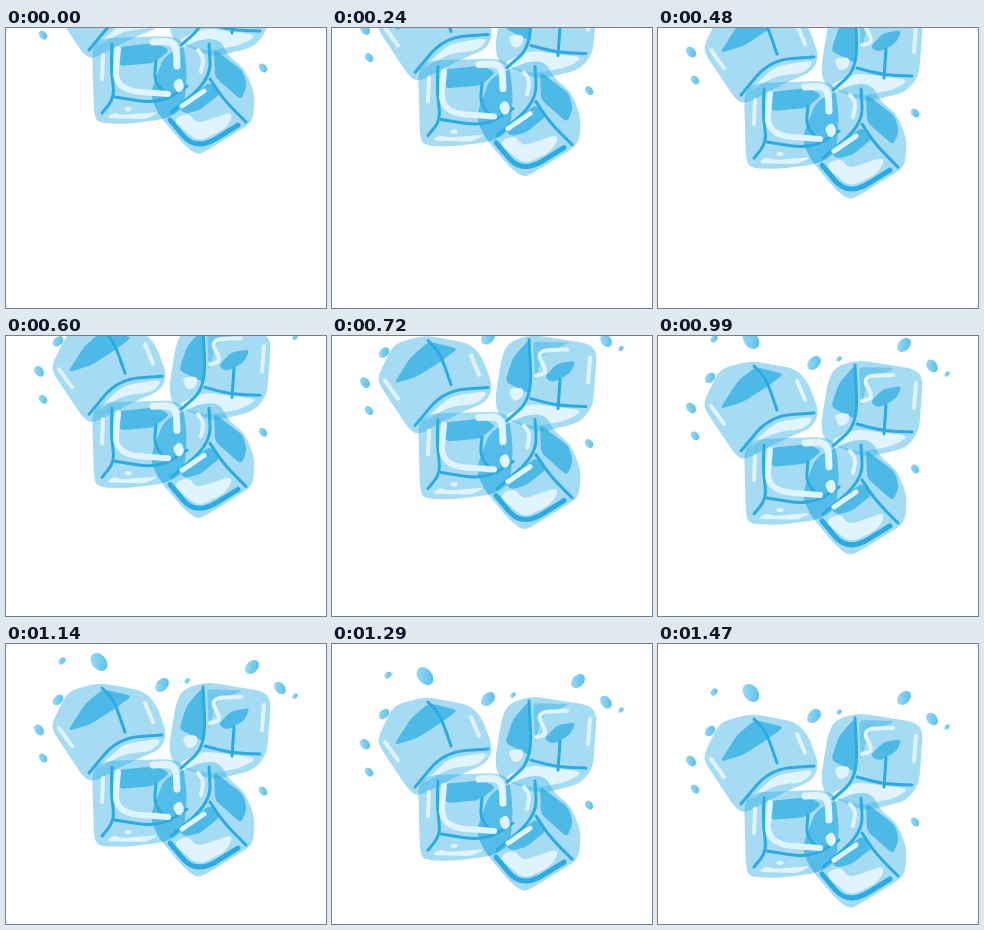
Recreate the animation shown at these times as an HTML page with a canvas. Size 320 by 280 pixels, loop 1.5 s.

```html
<!DOCTYPE html>
<html>
<head>
<meta charset="utf-8">
<style>
html, body { margin: 0; width: 100%; height: 100%; overflow: hidden; background: #fff }
canvas { display: block }
</style>
</head>
<body>
<canvas id="stage" width="320" height="280"></canvas>
<script>
const ctx = document.getElementById('stage').getContext('2d');
const ICE = 'rgba(41,171,226,.42)', MID = 'rgba(41,171,226,.7)', EDGE = '#2babe3', PALE = '#e0f4fd';
const STEP = 30, STEPS = 50, FALL = 2.816;

// Point on the way from p to q, at most r away and never past the middle
function toward(p, q, r) {
  const k = Math.min(.5, r / Math.hypot(q[0] - p[0], q[1] - p[1]));
  return [p[0] + (q[0] - p[0]) * k, p[1] + (q[1] - p[1]) * k];
}

// Path through corner points, each corner rounded
function outline(corners, closed, r = 10) {
  const pts = corners.split(' ').map(p => p.split(',').map(Number));
  const path = new Path2D(), n = pts.length;
  if (!closed) path.moveTo(...pts[0]);
  pts.forEach((p, i) => {
    if (!closed && (i === 0 || i === n - 1)) return path.lineTo(...p);
    path.lineTo(...toward(p, pts[(i + n - 1) % n], r));
    path.quadraticCurveTo(...p, ...toward(p, pts[(i + 1) % n], r));
  });
  if (closed) path.closePath();
  return path;
}

const layers = [];
function fill(color, corners, r) {
  const path = outline(corners, true, r);
  layers.push(() => { ctx.fillStyle = color; ctx.fill(path); });
  return path;
}
function line(color, width, corners) {
  const path = outline(corners, false, 30);
  layers.push(() => { ctx.strokeStyle = color; ctx.lineWidth = width; ctx.stroke(path); });
}
const shift = dy => layers.push(() => ctx.translate(0, dy));

shift(45);
// Back left cube
fill(ICE, '62,33 92,25 106,27 138,33 150,46 161,76 155,91 125,104 87,124 78,120 46,72 47,63');
fill(MID, '62,73 79,46 97,31 126,38 110,50 85,66', 5);
fill(PALE, '88,113 118,86 157,80 147,93 118,96');
line(EDGE, 3, '96,30 108,42 119,74');
line(EDGE, 3, '83,115 112,80 156,77');
line(PALE, 4, '139,45 147,64');
line(PALE, 4, '53,70 66,88');

// Back right cube
fill(ICE, '177,31 200,24 257,33 265,42 261,96 248,112 207,122 166,105 163,88 170,45');
fill(MID, '173,71 181,47 197,29 199,84', 5);
fill(MID, '212,67 225,53 244,50 238,63 221,72', 5);
fill(ICE, '201,31 238,32 210,44 203,72', 5);
fill(PALE, '170,106 197,93 252,100 235,110 200,116');
fill(PALE, '176,79 184,77 192,78 190,88 181,91', 5);
line(EDGE, 3, '197,29 200,88 175,110');
line(EDGE, 3, '199,88 225,95 254,96');
line(EDGE, 3, '228,69 226,98');
line(PALE, 4, '204,65 216,62 203,40 235,39');
line(PALE, 4, '258,47 256,72');

shift(93);
// Front cubes, darker where they cross
const right = fill(ICE, '158,28 195,11 214,11 222,28 238,40 249,66 247,94 200,123 191,127 178,117 152,86 144,66');
const left = fill(ICE, '86,20 97,10 165,8 177,13 181,45 178,80 160,91 120,96 92,95 88,87');
layers.push(() => {
  ctx.save();
  ctx.clip(left);
  ctx.fillStyle = ICE;
  ctx.fill(right);
  ctx.restore();
});
fill(MID, '112,19 150,15 164,22 148,35 113,38', 5);
fill(MID, '208,21 237,43 241,58 235,72 209,49', 5);
fill(MID, '172,78 204,54 215,65 194,82 178,86', 5);
fill(PALE, '166,92 183,84 190,96 228,83 221,100 192,114');
fill(PALE, '100,90 108,84 115,87 153,84 140,91', 5);
fill(PALE, '117,81 122,78 127,81 122,84', 5);
line(EDGE, 3, '106,16 105,44 109,69 96,85');
line(EDGE, 3, '109,69 153,76 181,58');
line(EDGE, 3, '150,33 148,53 160,67');
line(EDGE, 3, '203,16 205,51 165,85');
line(EDGE, 3, '204,51 218,72 240,94');
line(EDGE, 5, '164,92 190,123 232,97');
line(PALE, 4, '97,27 96,51');
line(PALE, 4, '192,22 198,30 195,44');
line(PALE, 5, '198,63 176,78');
line(PALE, 6, '112,21 108,62 162,66');
line(PALE, 7, '147,14 170,13 171,38');
fill(PALE, '166,55 175,49 179,60 172,66', 5);

// Drops as x,y,size, leaning right and left in turn
shift(-138);
const drops = '56,48,4 33,117,6 52,87,6 37,145,5 156,72,8 93,49,10 246,54,8 274,75,7 181,68,3 257,178,5 289,83,3';
drops.split(' ').forEach((drop, i) => {
  const [x, y, size] = drop.split(',').map(Number);
  const water = ctx.createLinearGradient(x - size, y, x + size, y);
  water.addColorStop(0, '#9cdcf6');
  water.addColorStop(1, '#55bdeb');
  layers.push(() => {
    ctx.fillStyle = water;
    ctx.beginPath();
    ctx.ellipse(x, y, size, size * .72, i % 2 ? .9 : -.8, 0, 2 * Math.PI);
    ctx.fill();
  });
});

ctx.lineCap = ctx.lineJoin = 'round';
const start = performance.now();
function draw() {
  const step = Math.floor((performance.now() - start) / STEP) % STEPS;
  ctx.clearRect(0, 0, 320, 280);
  ctx.save();
  ctx.translate(0, (step - STEPS + 1) * FALL);
  layers.forEach(paint => paint());
  ctx.restore();
  requestAnimationFrame(draw);
}
draw();
</script>
</body>
</html>
```
